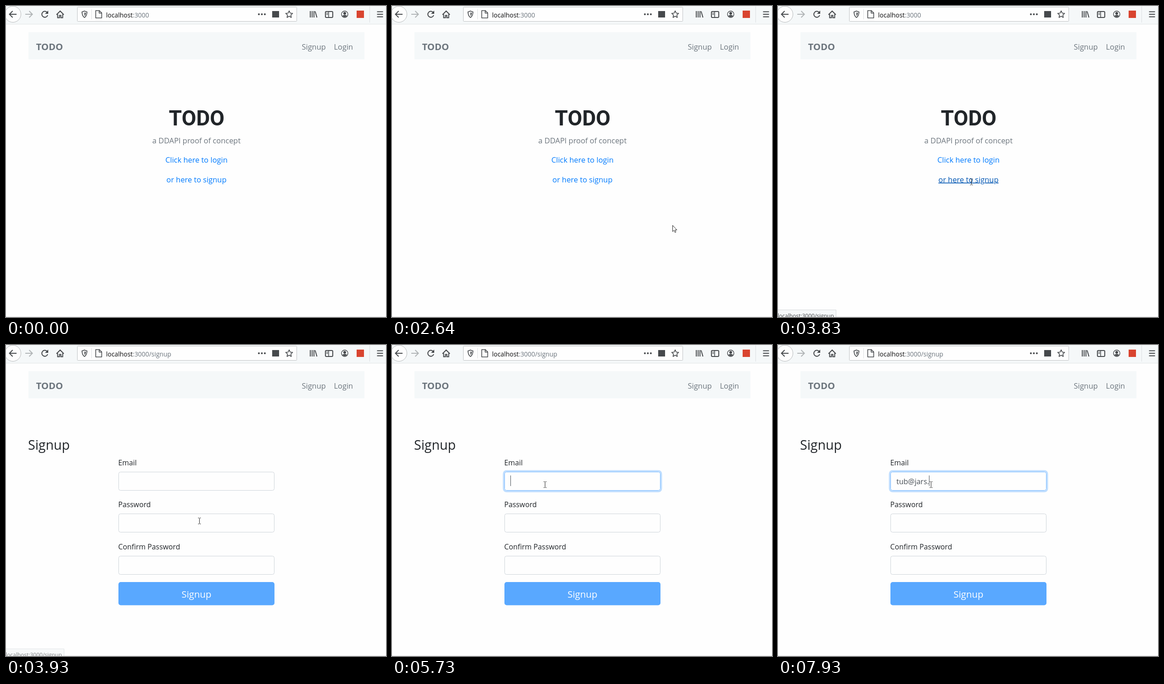
An HTML page for the animation above (8000 ms loop, 828 by 677 pixels).

```html
<!DOCTYPE html>
<html lang="en">
<head>
<meta charset="utf-8">
<title>TODO signup</title>
<style>
  html, body { margin: 0; width: 100%; height: 100%; overflow: hidden; background: #fefefe; }
  svg { display: block; width: 828px; height: 677px; font: 16.4px "Open Sans", "Noto Sans", sans-serif; fill: #212529; }
  .icon { fill: none; stroke: #46494c; stroke-width: 2; }
  .solid { fill: #46494c; stroke: none; }
  .muted { fill: #6c757d; }
  .link { fill: #007bff; }
  .hover { fill: #0056b3; text-decoration: underline; }
  .mid { text-anchor: middle; }
  .label { font-size: 15.8px; }
  .field { fill: #fefefe; stroke: #ced4da; }
  .pointer { fill: #fff; stroke: #222; stroke-linejoin: round; }
</style>
</head>
<body>
<svg viewBox="0 0 828 677">
  <rect width="828" height="677" fill="#fefefe"/>
  <path d="M0 676.5H828" stroke="#ececed"/>

  <!-- Browser toolbar -->
  <rect width="828" height="39" fill="#f5f8f9"/>
  <path d="M0 39.5H828" stroke="#e1e4e5"/>
  <circle cx="15" cy="18" r="17.5" fill="#fefefe" stroke="#b4b7b9"/>
  <g class="icon">
    <path d="M23 18H8M14.5 11L7.5 18L14.5 25"/>
    <path d="M42 18H57M50.5 11L57.5 18L50.5 25" stroke="#b0b4b6"/>
    <path d="M90 14.5A6.5 6.5 0 1 0 90.8 20"/>
    <path d="M92 10V17H85Z" class="solid"/>
    <path d="M110 19L118 11L126 19M112.5 18V25.5H116.5V20.5H119.5V25.5H123.5V18"/>
  </g>
  <rect x="155.5" y="2.5" width="478" height="31" rx="1" fill="#fefefe" stroke="#c0c3c5"/>
  <path d="M186.5 7V29M792.5 1V36" stroke="#dcdfe1"/>
  <g class="icon">
    <path d="M171 11L176.5 13Q176 22 171 25Q166 22 165.5 13Z" stroke-width="1.7"/>
    <path d="M171 14V22Q173.5 20 174 15Z" class="solid"/>
    <path d="M195.5 10H203.5L208.5 15V26H195.5ZM203 10V15.5H208.5" stroke-width="1.6" stroke-linejoin="round"/>
    <path d="M551 18H565" stroke-width="4" stroke-linecap="round" stroke-dasharray="0 6.5"/>
    <rect x="580" y="11" width="15" height="14" class="solid"/>
    <path id="star" stroke-width="1.6" stroke-linejoin="round"/>
    <path d="M663 11V25M667 11V25M671 11V25M673.5 11.5L677.5 25"/>
    <rect x="696" y="12" width="16" height="13" rx="2"/>
    <path d="M703 12V25M698 15.5H701.5M698 18.5H701.5" stroke-width="1.5"/>
    <circle cx="738" cy="18" r="7" stroke-width="1.4"/>
    <circle cx="738" cy="16" r="3" class="solid"/>
    <path d="M733 22Q734 19.5 738 19.5T743 22Q738 26 733 22Z" class="solid"/>
    <path d="M808.5 12.5H821.5M808.5 18H821.5M808.5 23.5H821.5"/>
  </g>
  <rect x="764" y="10" width="16" height="16" fill="#d9442f"/>
  <text x="218" y="24.5" font-size="13.9" fill="#0c0c0d">localhost<tspan class="muted">:3000<tspan id="path"></tspan></tspan></text>

  <!-- Page header -->
  <rect x="49" y="57" width="732" height="59" fill="#f5f8f9"/>
  <g class="muted">
    <text x="65.5" y="96" font-size="20.3" font-weight="700">TODO</text>
    <text x="644.5" y="94.5">Signup</text>
    <text x="714.5" y="94.5">Login</text>
  </g>

  <g id="home" class="mid">
    <text x="415.5" y="260" style="font:700 46px Roboto,sans-serif">TODO</text>
    <text x="415" y="298.5" class="muted">a DDAPI proof of concept</text>
    <text x="415" y="341" class="link">Click here to login</text>
    <text x="415" y="383.5" id="signupLink">or here to signup</text>
  </g>

  <g id="form">
    <text x="48" y="227.5" font-size="28.5">Signup</text>
    <rect id="glow" x="243.3" y="274.3" width="343.4" height="44.4" rx="6" fill="none" stroke="#bfdeff" stroke-width="3.4"/>
    <g id="fields"></g>
    <rect x="245" y="516" width="340" height="50.5" rx="5" fill="#59a8ff"/>
    <text x="415" y="550" class="mid" font-size="20.4" style="fill:#fff">Signup</text>
    <text id="typed" x="258" y="302.5" font-size="16" fill="#495057"></text>
    <rect id="caret" y="284" width="1" height="23" fill="#495057"/>
  </g>

  <g id="status">
    <path d="M-1 661.5H126.5V678H-1Z" fill="#f5f8f9" stroke="#d5d9db"/>
    <text x="-1" y="678.5" font-size="12" fill="#4a4d50">localhost:3000/signup</text>
  </g>

  <g id="cursor">
    <path id="arrow" class="pointer" d="M.5 .5V14L3.6 11.2L5.7 16L7.8 15L5.8 10.5H9.8Z"/>
    <path id="hand" class="pointer" d="M-1.5 9V1.5Q0 -1 1.5 1.5V7L7 8Q10 8 10 11Q10 16 8 19H0L-5 11Q-4 9 -1.5 12Z"/>
    <path id="beam" d="M-3 -6.5H-1L0 -5.5L1 -6.5H3M0 -5.5V5.5M-3 6.5H-1L0 5.5L1 6.5H3" fill="none" stroke="#222"/>
  </g>
</svg>
<script>
  const LOOP = 8000, CLICK = 3830, SIGNUP = 3930, FOCUS = 4770;
  const KEY_GAP = 155, BLINK = 560, STEP = 80;
  const bursts = [["tub", 6030], ["@jars", 6830], [".", 7930]];
  const glides = [
    { start: 50, time: 400, from: [832, 696], to: [626, 484] },
    { start: 2560, time: 700, from: [626, 484], to: [421, 383] },
    { start: 4200, time: 500, from: [421, 383], to: [333, 304] }
  ];

  const $ = id => document.getElementById(id);
  const show = (id, on) => $(id).setAttribute("visibility", on ? "inherit" : "hidden");
  const clamp = v => Math.max(0, Math.min(1, v));
  const ease = u => (u + u * u * (3 - 2 * u)) / 2;

  $("star").setAttribute("d", "M" + Array.from({ length: 10 }, (_, i) => {
    const angle = i * Math.PI / 5, r = i % 2 ? 3.8 : 8;
    return `${617 + r * Math.sin(angle)} ${18.5 - r * Math.cos(angle)}`;
  }).join("L") + "Z");

  $("fields").innerHTML = ["Email", "Password", "Confirm Password"].map((label, i) =>
    `<g transform="translate(245 ${Math.round(i * 91.3)})">
      <text x="-.5" y="262" class="label">${label}</text>
      <rect class="field" x=".5" y="276.5" width="339" height="40" rx="4"/>
    </g>`).join("");
  const email = document.querySelector(".field");

  // The pointer is sampled in even steps along each glide.
  function pointerAt(t) {
    const g = glides.filter(g => g.start <= t).pop() || glides[0];
    const steps = Math.round(g.time / STEP);
    const u = ease(Math.floor(clamp((t - g.start) / g.time) * steps) / steps);
    return g.from.map((v, i) => v + (g.to[i] - v) * u);
  }

  function typedAt(t) {
    let text = "", last = FOCUS;
    for (const [part, start] of bursts) {
      [...part].forEach((char, i) => {
        const time = start + i * KEY_GAP;
        if (time <= t) { text += char; last = time; }
      });
    }
    return { text, last };
  }

  function draw(t) {
    const [x, y] = pointerAt(t);
    const signedUp = t >= SIGNUP;
    const overLink = !signedUp && y < 391;
    const beam = t >= CLICK && (y < 317 || y > 367);
    const hand = overLink && t < CLICK;

    show("home", !signedUp);
    show("form", signedUp);
    $("path").textContent = signedUp ? "/signup" : "";
    $("signupLink").setAttribute("class", overLink ? "hover" : "link");
    $("status").setAttribute("opacity", clamp((t - 3370) / 140) * clamp((4070 - t) / 210));

    const focus = clamp((t - FOCUS + 70) / 140);
    email.style.stroke = `color-mix(in srgb, #80bdff ${focus * 100}%, #ced4da)`;
    show("glow", focus === 1);

    const { text, last } = typedAt(t);
    $("typed").textContent = text;
    show("caret", t >= FOCUS && (t - last + 160) % (2 * BLINK) < BLINK);
    $("caret").setAttribute("x", 258 + Math.round($("typed").getComputedTextLength()));

    $("cursor").setAttribute("transform", `translate(${Math.round(x) + (beam ? .5 : 0)} ${Math.round(y)})`);
    show("arrow", !beam && !hand);
    show("hand", hand);
    show("beam", beam);
  }

  const start = performance.now();
  function tick() {
    draw((performance.now() - start) % LOOP);
    requestAnimationFrame(tick);
  }
  tick();
</script>
</body>
</html>
```
